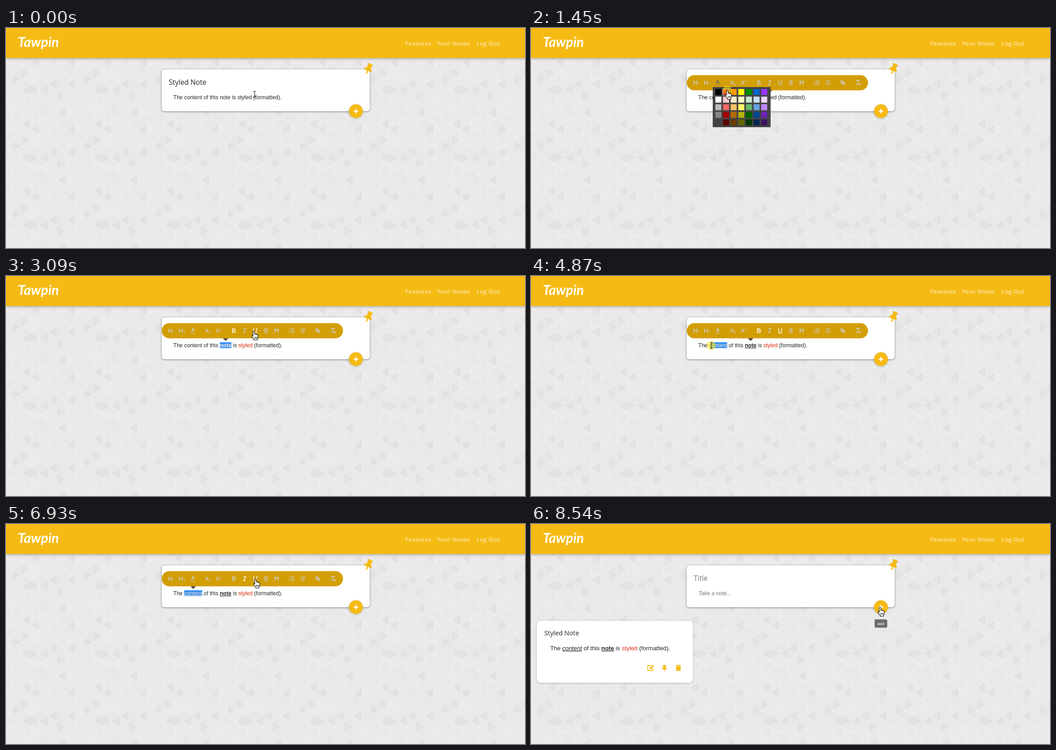
An HTML page with a canvas that plays this animation: 1148x488 px, repeating every 8.92 s.

```html
<!DOCTYPE html>
<html lang="en">
<head>
<meta charset="utf-8">
<title>Styled note</title>
<style>
html, body { margin: 0; width: 100%; height: 100%; overflow: hidden; background: #e9e9e9; }
canvas, svg { position: absolute; left: 0; top: 0; }
text { font-family: "Open Sans", "Noto Sans", sans-serif; fill: #212529; white-space: pre; }
.body { font-family: "Liberation Sans", Arial, sans-serif; font-size: 12.1px; }
.nav { font-size: 13.2px; font-weight: 700; fill: #fff; fill-opacity: .5; }
.brand { font: italic 700 30px Lato, sans-serif; fill: #fff; }
.b { font-weight: 700; }
.i { font-style: italic; }
.u { text-decoration: underline; }
.red { fill: #dc2c14; }
.hint { fill: #757575; }
.sel, .sel tspan { fill: #fff; }
.gold { fill: #f5ba13; }
.lift { filter: drop-shadow(0 1px 2px rgba(0,0,0,.45)); }
.soft { filter: drop-shadow(0 1px 2px rgba(0,0,0,.22)); }
.bar { filter: drop-shadow(0 1px 3px rgba(0,0,0,.35)); }
.icon { fill: none; stroke: #ccc; stroke-width: 1.8; stroke-linecap: round; stroke-linejoin: round; }
.icon.on { stroke: #fff; }
.icon.dim { stroke: #6c6a62; }
.icon text { font: 700 7px "Open Sans", sans-serif; fill: #ccc; stroke: none; }
.thin { stroke-width: 1.1; }
</style>
</head>
<body>
<canvas id="bg" width="1148" height="488"></canvas>
<svg width="1148" height="488" viewBox="0 0 1148 488">
  <defs>
    <path id="pin" d="M4 0H14Q15 0 15 1V3Q15 4 14 4H13L13.5 9.5Q17.6 11.5 18 15Q18 16 17 16H10.4V21.5L9 24L7.6 21.5V16H1Q0 16 0 15Q.4 11.5 4.5 9.5L5 4H4Q3 4 3 3V1Q3 0 4 0Z"/>
    <clipPath id="clip"><rect id="clipBox" y="147" height="13"/></clipPath>
  </defs>

  <rect class="gold bar" width="1148" height="66.5"/>
  <text class="brand" x="26" y="42">Tawpin</text>
  <text class="nav" x="883" y="39">Features</text>
  <text class="nav" x="953" y="39">Your Notes</text>
  <text class="nav" x="1040.5" y="39">Log Out</text>

  <rect class="lift" x="344.5" y="92" width="460" height="92.5" rx="6" fill="#fff"/>
  <text id="title" x="360" y="126.3" font-size="15.5"></text>
  <rect id="mark" y="147" height="13" fill="#3390ff"/>
  <text id="note" class="body" x="370" y="158"></text>
  <text id="noteSel" class="body sel" x="370" y="158" clip-path="url(#clip)"></text>
  <use href="#pin" class="gold" transform="translate(801.6 91) rotate(24) scale(1.02) translate(-9 -12)"/>

  <circle class="gold soft" id="disc" cx="774" cy="184.5" r="15.3"/>
  <path d="M769 184.5H779M774 179.5V189.5" stroke="#fff" stroke-width="2.3"/>
  <g id="tip">
    <rect x="760" y="211.5" width="28" height="18.5" rx="3.5" fill="#6b6b6b"/>
    <text x="774" y="223.5" font-size="7.8" font-weight="600" style="fill:#fff" text-anchor="middle">Add</text>
  </g>

  <g id="saved">
    <rect class="soft" x="13" y="215" width="345" height="137" rx="8" fill="#fff"/>
    <text x="29.5" y="247" font-size="14.3" font-weight="500">Styled Note</text>
    <text id="savedNote" class="body" x="42.5" y="280" style="font-size:13.3px"></text>
    <g fill="none" stroke="#f5ba13" stroke-width="1.8" stroke-linejoin="round">
      <path d="M265.5 314H258.3V325H269.3V319.5"/>
      <path d="M263 321.5L270.5 314" stroke-width="3.4"/>
    </g>
    <use href="#pin" class="gold" transform="translate(289.6 313) scale(.62 .58)"/>
    <path class="gold" d="M320 313.5H323.5L324.3 312.3H327.7L328.5 313.5H332V315.3H320ZM320.7 316.3H331.3L330.6 325.7H321.4Z"/>
  </g>

  <g id="toolbar">
    <path id="arrow" d="M-6 138H6L0 144Z" fill="#444"/>
    <rect x="344.5" y="104.5" width="401" height="33.7" rx="16.85" fill="#d39e03"/>
    <g id="icons"></g>
  </g>
  <g id="picker"></g>

  <circle id="press" r="10" fill="#ffec00" fill-opacity=".5"/>
  <path id="hand" fill="#fff" stroke="#000" stroke-width="1.1" stroke-linejoin="round" d="M-1.7 1.5Q-1.7 0 0 0T1.7 1.5V7Q1.9 5.9 3.2 6T4.6 7.4Q5 6.6 6 6.9T7.2 8.3Q8 7.7 8.8 8.2T9.5 9.5V13Q9.3 16 7.8 17.3V20H.5V18Q-2 15.5-4 12.2Q-5 10.5-3.8 10T-1.7 11.2ZM2 13V16.5M4.4 13V16.5M6.8 13V16.5"/>
  <path id="beam" fill="none" stroke="#222" stroke-width="1.1" d="M-3-6.5H3M0-6.5V6.5M-3 6.5H3"/>
</svg>
<script>
const LOOP = 8920;
const $ = id => document.getElementById(id);
const show = (id, on) => { $(id).style.display = on ? '' : 'none'; };
const within = (t, a, b) => t >= a && t < b;
const clamp = (v, a, b) => Math.min(b, Math.max(a, v));
const fract = v => v - Math.floor(v);

// Wallpaper: sideways triangles that repeat every 8 columns and 6 rows.
function drawWallpaper() {
  const c = $('bg').getContext('2d'), w = 158.67 / 8, h = 25;
  c.fillStyle = '#e9e9e9';
  c.fillRect(0, 0, 1148, 488);
  c.strokeStyle = 'rgba(255,255,255,.22)';
  const triangle = (base, apex, y, seed) => {
    const n = fract(Math.sin(seed + 1) * 43758.5);
    const g = n > .91 ? 226 : 231 + n * 4;
    c.fillStyle = `rgb(${g},${g},${g})`;
    c.beginPath();
    c.moveTo(base, y - h / 2);
    c.lineTo(apex, y);
    c.lineTo(base, y + h / 2);
    c.closePath();
    c.fill();
    c.stroke();
  };
  for (let k = -1; k < 58; k++) for (let j = 2; j < 21; j++) {
    const x = 14 + k * w, odd = k & 1, seed = (k + 8) % 8 * 6 + j % 6;
    triangle(x, x + w, (j + (odd ? 0 : .5)) * h, seed);
    triangle(x + w, x, (j + (odd ? .5 : 0)) * h, seed + 48);
  }
}

// Toolbar icons in groups, drawn on an 18-unit grid.
const thin = d => `<path class="thin" d="${d}"/>`;
const small = (s, y) => `<text x="13" y="${y}">${s}</text>`;
const line = d => `<path d="${d}"/>`;
const rows = x => line([4, 9, 14].map(y => `M${x} ${y}H15`).join(''));
const head = line('M2 4V14M10 4V14M2 9H10'), cross = line('M3 5L10 13M10 5L3 13');
const loop = 'M8 11L4.5 13.5A3.3 3.3 0 0 1 4.5 7L7 5';
const groups = [
  { h1: head + small(1, 14), h2: head + small(2, 14), color: line('M5.5 11L9 3L12.5 11M6.4 9H11.6') + thin('M3 15.5H15') },
  { sub: cross + small(2, 16), sup: cross + small(2, 7) },
  {
    bold: line('M5 4H9.5a2.5 2.5 0 0 1 0 5H5ZM5 9H10.5a2.5 2.5 0 0 1 0 5H5Z'),
    italic: line('M7 4H13M5 14H11M8 14L10 4'),
    underline: line('M5 3V9a4 4 0 0 0 8 0V3') + thin('M3.5 15.5H14.5'),
    strike: line('M12.5 5.5C11 2.5 5.5 3 5.5 6S12.5 9 12.5 12S6.5 15.5 5 12.5') + thin('M2.5 9.5L15.5 8.5'),
    quote: line('M4 5H7V8H4ZM7 8q0 4-3 5M11 5H14V8H11ZM14 8q0 4-3 5')
  },
  { ol: rows(7.5) + thin('M3 2V5.5M2 8H4V10.5H2M2 13H4V16H2'), ul: rows(6.5) + line('M3 4h.01M3 9h.01M3 14h.01') },
  { link: `<g transform="rotate(45 9 9)">${line('M7 6H5.5a3 3 0 0 0 0 6H7M11 6H12.5a3 3 0 0 1 0 6H11M6.5 9H11.5M7 6a3 3 0 0 1 0 6M11 6a3 3 0 0 0 0 6')}</g>` },
  { clean: line('M5 3H13M6 12L9.4 3M11 11L15 15M15 11L11 15') + thin('M2.5 14.5H8.5') }
];
const iconX = {};
let nextX = 366;
for (const group of groups) {
  for (const id in group) {
    iconX[id] = nextX;
    $('icons').innerHTML += `<g id="${id}" class="icon" transform="translate(${nextX - 7.6} 113.6) scale(.843)">${group[id]}</g>`;
    nextX += 23.6;
  }
  nextX += 10.1;
}

// Picker: greys, then each hue plain, tinted twice and shaded twice.
const mix = (a, b, p) => `color-mix(in srgb, ${a}, ${b} ${p}%)`;
const tones = [c => c, c => mix(c, '#fff', 80), c => mix(c, '#fff', 40), c => mix(c, '#000', 30), c => mix(c, '#000', 60)];
const greys = ['#000', '#fff', '#bbb', '#888', '#444'];
const hues = ['#e60000', '#f90', '#ff0', '#008a00', '#06c', '#93f'];
const cell = (col, row, style) =>
  `<rect x="${407.8 + col * 16.9}" y="${135.3 + row * 16.9}" width="13.3" height="13.3" style="${style}"/>`;
$('picker').innerHTML = '<rect x="402" y="131" width="128" height="89" fill="#444"/>' +
  tones.map((tone, row) => [greys[row], ...hues.map(tone)].map((c, col) => cell(col, row, 'fill:' + c)).join('')).join('') +
  `<g id="ring">${cell(1, 0, 'fill:none;stroke:#fff')}</g>`;

// Moments at which the note or the interface changes
const at = {
  pick: 1010, red: 1500, reselect: 1620, bold: 2470, under: 3470, clear: 4240,
  content: 4940, italic: 5380, under2: 6930, leave: 7540, save: 8300, settle: 8540
};
// Left and right edge of each word that gets selected
const words = { styled: [512, 543.5], note: [473, 498.5], content: [394, 434] };

// Pointer script: start, duration, place, then how long the button is held
const moves = [], TEXT = 154, BAR = 122;
const go = (start, ms, x, y, held = 0) => moves.push({ start, end: start + ms, x, y, held });
go(80, 140, words.styled[1], TEXT, 370);
go(260, 260, 509, TEXT);
go(670, 280, iconX.color - 1, BAR + 2, 90);
go(1050, 250, 434, 138, 200);
go(1500, 110, words.note[1], TEXT, 480);
go(1790, 300, 476, TEXT);
go(2170, 220, iconX.bold, BAR, 110);
go(2620, 470, 548, BAR);
go(3250, 70, 548.5, BAR, 150);
go(3470, 390, words.content[1], TEXT + 2);
go(4000, 240, words.content[1], TEXT, 780);
go(4410, 530, 397, TEXT);
go(5020, 70, 525, 130);
go(5170, 70, 525, 130, 140);
go(5540, 410, 630, 128);
go(5950, 520, iconX.underline, BAR);
go(6620, 80, iconX.underline + .5, BAR, 230);
go(6930, 300, 771, 186);
go(7330, 200, 614, TEXT, 80);
go(7680, 220, 772, 184.5);
go(8120, 80, 772, 184.5, 100);

function pointer(t) {
  let x = 550, y = 147;
  for (const m of moves) {
    const u = clamp((t - m.start) / (m.end - m.start), 0, 1), e = u * u * (3 - 2 * u);
    x += (m.x - x) * e;
    y += (m.y - y) * e;
  }
  return [x, y];
}

function selection(t, x) {
  const drag = (word, until) => [t < until ? clamp(x, ...words[word]) : words[word][0], words[word][1]];
  if (within(t, 220, at.pick)) return drag('styled', 520);
  if (within(t, at.reselect, at.clear)) return drag('note', 2090);
  if (within(t, at.clear, at.leave)) return drag('content', at.content);
  return [0, 0];
}

function noteText(t) {
  const span = (text, ...names) => `<tspan class="${names.filter(Boolean).join(' ')}">${text}</tspan>`;
  return 'The ' + span('content', t >= at.italic && 'i', t >= at.under2 && 'u') + ' of this ' +
    span('note', t >= at.bold && 'b', t >= at.under && 'u') + ' is ' +
    span('styled', t >= at.red && 'red') + ' (formatted).';
}

let lastNote;
function render(t) {
  const [x, y] = pointer(t);
  const toolbar = within(t, 670, at.reselect) || within(t, 2090, at.leave);
  const picker = within(t, at.pick, at.red);
  const saved = t >= at.save;

  $('title').textContent = saved ? 'Title' : 'Styled Note';
  $('title').classList.toggle('hint', saved);
  const note = saved ? '<tspan class="i hint">Take a note...</tspan>' : noteText(t);
  if (note !== lastNote) $('note').innerHTML = $('noteSel').innerHTML = lastNote = note;

  const [left, right] = selection(t, x);
  for (const id of ['mark', 'clipBox']) {
    $(id).setAttribute('x', left);
    $(id).setAttribute('width', right - left);
  }

  show('toolbar', toolbar);
  const [a, b] = words[t < at.reselect ? 'styled' : t < at.content ? 'note' : 'content'];
  $('arrow').setAttribute('transform', `translate(${(a + b) / 2} 0)`);
  const active = {
    bold: within(t, at.bold, at.content),
    italic: t >= at.italic,
    underline: within(t, at.under, at.content) || t >= at.under2
  };
  for (const id in iconX) {
    const hover = Math.abs(x + 2 - iconX[id]) < 10 && within(y, 108, 134);
    $(id).classList.toggle('on', !!active[id] || hover);
  }
  $('color').classList.toggle('dim', picker);
  show('picker', picker);
  show('ring', t > 1220);

  const onPlus = Math.hypot(x - 774, y - 184.5) < 16;
  $('disc').style.fill = onPlus && t < at.settle ? '#f8cc52' : '#f5ba13';
  $('tip').style.opacity = clamp((t - 7800) / 130, 0, 1);
  show('saved', saved);

  const hand = picker || onPlus || toolbar && y < 138;
  show('hand', hand);
  show('beam', !hand);
  $(hand ? 'hand' : 'beam').setAttribute('transform', `translate(${x} ${y})`);
  show('press', moves.some(m => within(t, m.end, m.end + m.held)));
  $('press').setAttribute('cx', x);
  $('press').setAttribute('cy', y);
}

drawWallpaper();
$('savedNote').innerHTML = noteText(LOOP);
const start = performance.now();
function tick() {
  render((performance.now() - start) % LOOP);
  requestAnimationFrame(tick);
}
tick();
</script>
</body>
</html>
```
